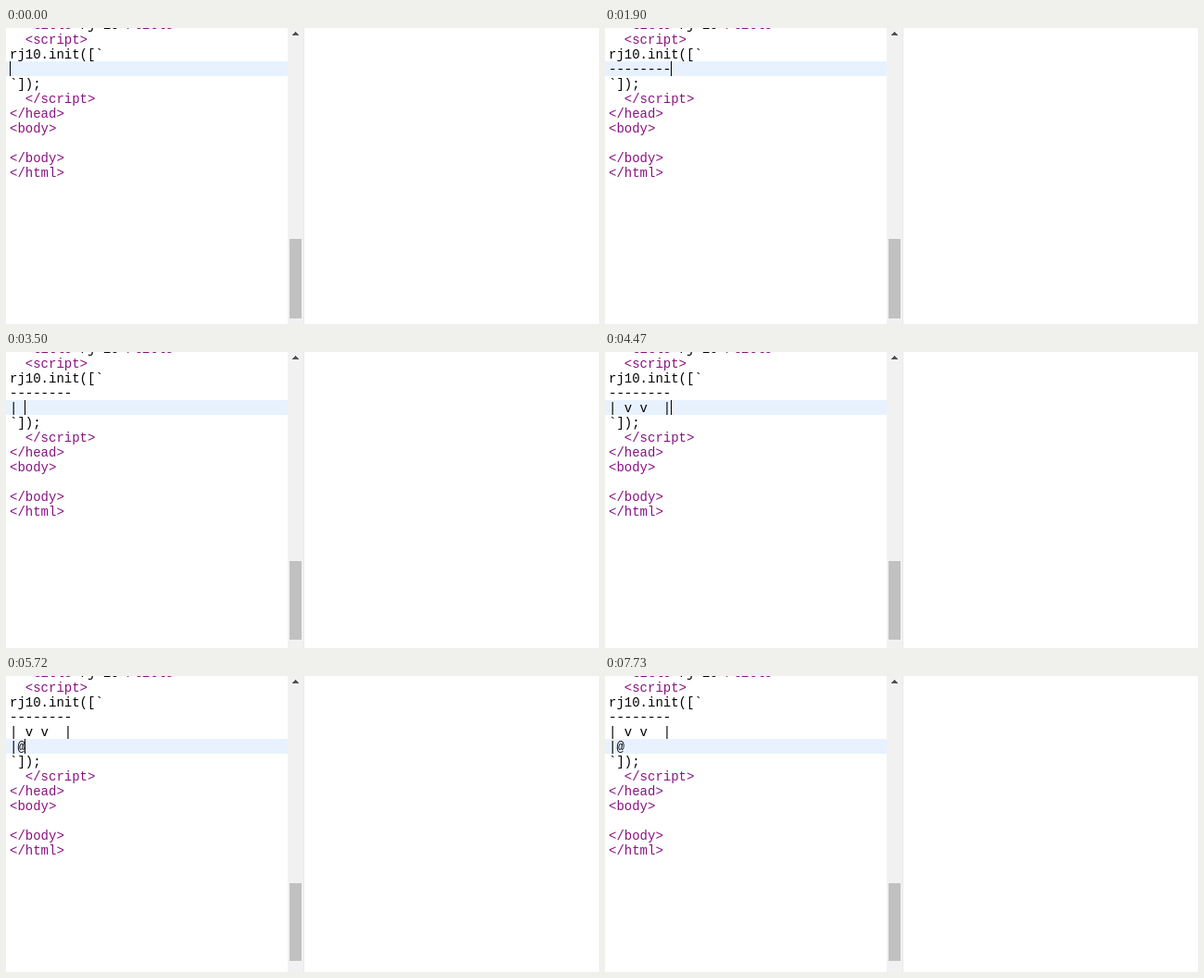
An HTML page for the animation above (8 s loop, 640 by 320 pixels).

```html
<!DOCTYPE html>
<html lang="en">
<head>
<meta charset="utf-8">
<title>Typing in a code editor</title>
<style>
  html, body { margin: 0; width: 100%; height: 100%; overflow: hidden; background: #fff; }
  svg { display: block; }
  text {
    font: 14px "Liberation Mono", "DejaVu Sans Mono", monospace;
    font-variant-ligatures: none;
    white-space: pre;
    fill: #000;
  }
  .tag { fill: #881280; }
  .dashes { font-family: "Noto Sans Mono", monospace; }
</style>
</head>
<body>
<svg width="640" height="320" viewBox="0 0 640 320">
  <rect width="640" height="320" fill="#fff"/>
  <rect id="active" width="304" height="16" fill="#e8f2ff"/>
  <g id="code"></g>
  <rect id="cursor" width="1" height="16"/>
  <rect x="304" width="17" height="320" fill="#f1f1f1"/>
  <rect x="321" width="1" height="320" fill="#e9e9e9"/>
  <path d="M308.5 8L312.5 4L316.5 8Z" fill="#505050" shape-rendering="crispEdges"/>
  <rect id="thumb" x="306" width="13" fill="#c1c1c1"/>
</svg>
<script>
const LOOP = 8000, LEFT = 4, CHAR = 8.4, ROW = 16, FIRST_ROW = 3;
const $ = id => document.getElementById(id);

const before = ['  <title>rj-10</title>', '  <script>', 'rj10.init([`'];
const after = ['`]);', '  <\/script>', '</head>', '<body>', '', '</body>', '</html>'];
const typed = ['--------', '| v v  |', '|@      '];

// Each step: time, typed row, characters in that row, caret shown
const steps = [[0, 0, 0, true], [250, 0, 0, false]];
const add = (time, row, count, caret = true) => steps.push([time, row, count, caret]);
const run = (start, end, row, from, to) => {
  for (let n = from; n <= to; n++) add(start + (end - start) * (n - from) / (to - from), row, n);
};

run(680, 1680, 0, 1, 7);
add(1900, 0, 8);
add(2140, 1, 0);
add(2700, 1, 0, false);
add(2760, 1, 1);
add(3290, 1, 1, false);
run(3464, 3986, 1, 2, 5);
add(4160, 1, 7);
add(4470, 1, 8);
add(4710, 2, 0);
add(5010, 2, 1);
add(5480, 2, 1, false);
add(5720, 2, 2);
add(5970, 2, 3);
add(6070, 2, 4);
run(6380, 6650, 2, 5, 7);
add(7200, 2, 6);
add(7730, 2, 6, false);

const classes = { '<': 'tag', '-': 'dashes' };
const rowTop = row => (row - 1) * ROW + 4;

function set(el, attrs) {
  for (const name in attrs) el.setAttribute(name, attrs[name]);
}

function drawLine(line, row) {
  const text = document.createElementNS('http://www.w3.org/2000/svg', 'text');
  set(text, { x: LEFT, y: rowTop(row) + 13 });
  for (const part of line.split(/(<[^>]*>|-+)/)) {
    const span = document.createElementNS('http://www.w3.org/2000/svg', 'tspan');
    span.textContent = part;
    set(span, { class: classes[part[0]] || '' });
    text.append(span);
  }
  return text;
}

let shown;
function render(ms) {
  const step = steps.findLast(s => s[0] <= ms);
  if (step === shown) return;
  shown = step;
  const [, row, count, caret] = step;
  const lines = [...before, ...typed.slice(0, row), typed[row].slice(0, count), ...after];
  const y = rowTop(FIRST_ROW + row);
  $('code').replaceChildren(...lines.map(drawLine));
  set($('active'), { y });
  set($('cursor'), { x: Math.floor(LEFT + count * CHAR), y, opacity: caret ? 1 : 0 });
  set($('thumb'), { y: 228 - 2 * row, height: 86 - row });
}

const start = performance.now();
function tick() {
  render((performance.now() - start) % LOOP);
  requestAnimationFrame(tick);
}
tick();
</script>
</body>
</html>
```
